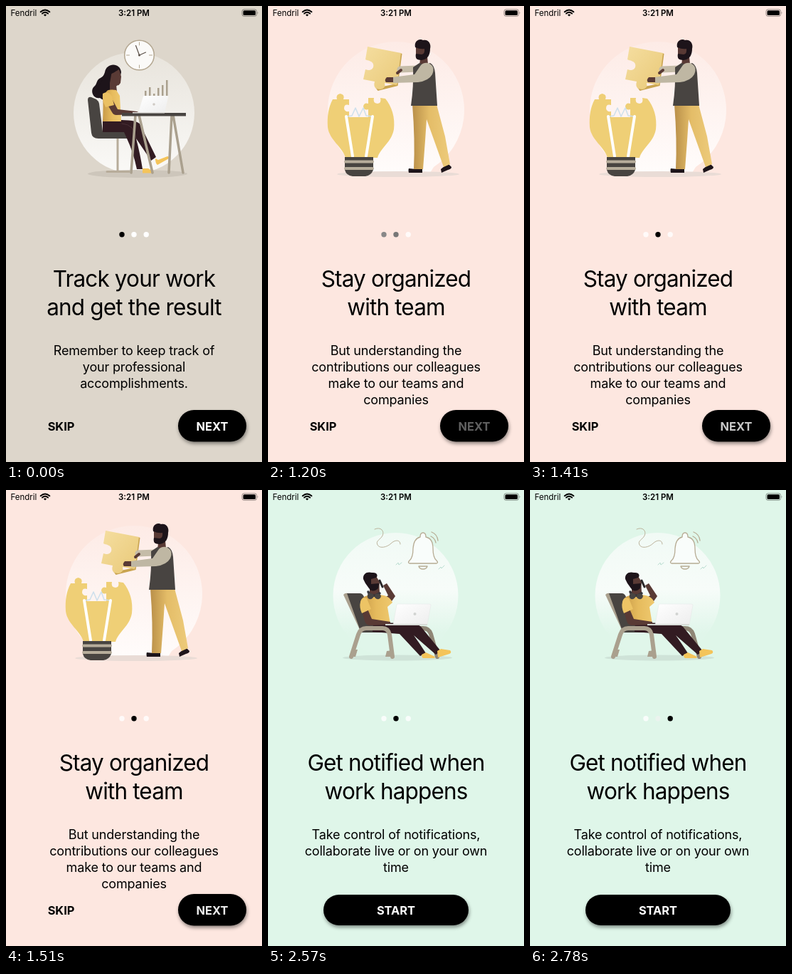
An HTML page for the animation above (2840 ms loop, 360 by 640 pixels).

```html
<!DOCTYPE html>
<html lang="en">
<head>
<meta charset="utf-8">
<title>Onboarding</title>
<style>
html, body { margin: 0; width: 100%; height: 100%; overflow: hidden; }
svg { display: block; width: 360px; height: 640px; }
text { font-family: Inter, Roboto, "Liberation Sans", sans-serif; font-optical-sizing: none; }
.mid text, text.mid { text-anchor: middle; }
.title { font-size: 31.5px; letter-spacing: -.85px; }
.body { font-size: 18px; letter-spacing: -.17px; }
.btn { font-size: 16.4px; font-weight: 700; }
.time { font-size: 11.5px; font-weight: 600; }
.net { font-size: 11.5px; }
.pill { filter: drop-shadow(1.5px 3px 2.5px rgba(0,0,0,.42)); }

.page, .nav, .next, .dot { animation: 2840ms step-end infinite; }
.work { animation-name: work; }
.team { animation-name: team; }
.calm { animation-name: calm; }
.nav { animation-name: nav; }
.next { animation-name: next; }
.d1 { animation-name: d1; }
.d2 { animation-name: d2; }
.d3 { animation-name: d3; }

@keyframes work { 0% { visibility: visible } 38.03%, 100% { visibility: hidden } }
@keyframes team { 0% { visibility: hidden } 38.03% { visibility: visible } 90.49%, 100% { visibility: hidden } }
@keyframes calm { 0% { visibility: hidden } 90.49%, 100% { visibility: visible } }
@keyframes nav { 0% { visibility: visible } 90.49%, 100% { visibility: hidden } }
@keyframes next {
  0% { fill: #fff } 38.03% { fill: #343434 } 42.25% { fill: #606060 } 46.13% { fill: #929292 }
  49.65% { fill: #c8c8c8 } 53.17% { fill: #ececec } 57.04%, 100% { fill: #fff }
}
@keyframes d1 { 0% { fill: #000 } 42.25% { fill: #888 } 46.13%, 100% { fill: #fffc } }
@keyframes d2 {
  0% { fill: #fff } 38.03% { fill: #fffc } 42.25% { fill: #777 } 46.13% { fill: #000 }
  94.37% { fill: #888 } 97.89%, 100% { fill: #ebf3ee }
}
@keyframes d3 { 0% { fill: #fff } 38.03% { fill: #fffc } 94.37% { fill: #777 } 97.89%, 100% { fill: #000 } }

.line { fill: none; stroke-linecap: round; stroke-linejoin: round; }
.dark { fill: #484441; }
.wood { fill: #aaa08e; }
.skin { fill: #593a35; }
.hair { fill: #1d141a; }
.trouser { fill: #321b22; }
.shoe { fill: #f4c45a; }
</style>
</head>
<body>
<svg viewBox="0 0 360 640">
  <defs>
    <linearGradient id="glowA" x2="0" y2="1"><stop stop-color="#e8e4dc"/><stop offset="1" stop-color="#faf9f7"/></linearGradient>
    <linearGradient id="glowB" x2="0" y2="1"><stop stop-color="#fdebe6"/><stop offset="1" stop-color="#fffcfb"/></linearGradient>
    <linearGradient id="glowC" x2="0" y2="1"><stop stop-color="#f1faf5"/><stop offset=".45" stop-color="#f7fcf9"/><stop offset=".8" stop-color="#e0f6ea"/></linearGradient>
    <linearGradient id="shirt"><stop stop-color="#c89a48"/><stop offset=".5" stop-color="#e6bb5d"/><stop offset="1" stop-color="#efc96f"/></linearGradient>
    <linearGradient id="chino"><stop stop-color="#b98f49"/><stop offset=".45" stop-color="#e4bd68"/><stop offset="1" stop-color="#edcb7b"/></linearGradient>
    <linearGradient id="piece" x2="1" y2="1"><stop stop-color="#f5dea0"/><stop offset="1" stop-color="#e9c978"/></linearGradient>
    <linearGradient id="lid" x2="1" y2="1"><stop stop-color="#fff"/><stop offset="1" stop-color="#ededed"/></linearGradient>
  </defs>

  <!-- desk -->
  <g class="page work">
    <path fill="#ddd6cb" d="M0 0h360v640H0z"/>
    <circle cx="180" cy="150" r="85" fill="url(#glowA)"/>
    <ellipse cx="185" cy="235.5" rx="70" ry="5.5" fill="#cdc6bb"/>
    <circle cx="187.5" cy="69" r="20.8" fill="#fbfaf8" stroke="#b3a690" stroke-width="1.5"/>
    <path class="line" stroke="#b3a690" d="M187.500 51v4m0 28v4M169.500 69h4m28 0h4"/>
    <path class="line" stroke="#5b5048" stroke-width="1.200" d="M182.500 55.500l5 13.500 9-4"/>
    <circle cx="187.500" cy="69" r="1.500" fill="#5b5048"/>
    <path class="wood" d="M195 119h2.500v8H195zM201 114h2.500v13H201zM207 123h2.500v5H207zM213 115h2.500v12H213zM219 111h2.500v16H219zM225 104h2.500v23H225z"/>
    <!-- chair -->
    <path class="line" stroke="#b7ac9a" stroke-width="3" d="M157 186v46M142 232.500h31"/>
    <path class="dark" d="M115 132q0-5 5-4l7 3q3 2 4 6l5 39h46q5 0 5 5t-5 5h-52q-9 0-10-8z"/>
    <!-- woman -->
    <path class="trouser" d="M136 160h26q24 0 27 7l22 45-7 5-21-31q6 23 9 43h-8q-5-24-14-43l-4-9h-30z"/>
    <path class="line" stroke="#4a3036" d="M163 165q18 1 20 21"/>
    <path class="shoe" d="M192 228h8l7 4q1 2-1 2.500h-14zM210 214l4 2 13-5q3 0 2 3l-16 9q-3-2-3-9z"/>
    <path class="hair" d="M139 93c2-14 22-14 23 0l-3 14-7 10c-6 16-14 17-20 12-10 2-14-11-8-16 4-3 3-8 7-11 4-2 6-3 8-9z"/>
    <path class="skin" d="M146 96c6-2 9-5 13-7l3 10-1 9q-3 5-6 3l1 9-10 1z"/>
    <path d="M136 121q8-5 19-3l5 8 2 36h-26q1-19 0-41z" fill="url(#shirt)"/>
    <path class="hair" d="M141 93l8-2-3 17q-1 12-10 16l-7-8z"/>
    <path class="skin" d="M139 132l10-2 8 15 27 3q4 1 2 4l-31 1q-4 0-6-4z"/>
    <path d="M136 123q8-5 13 4l3 12-12 3q-5-9-4-19z" fill="#eac062"/>
    <!-- table -->
    <path class="line" stroke="#aaa08e" stroke-width="3.500" stroke-linecap="butt" d="M182 153l-6 81M187 153l19 81M233 153l-4 81M235 153l14 81"/>
    <path class="dark" d="M163 150h90v4.500h-90z"/>
    <path fill="url(#lid)" d="M194 126h33q2 0 1 2l-5 22h-37l7-23z"/>
    <path fill="#e2e0dd" d="M178 149h45v1.500h-45z"/>
    <circle cx="208" cy="138" r="1.800" fill="#cfcac4"/>
    <g class="mid">
      <g class="title"><text x="180" y="394">Track your work</text><text x="180" y="434">and get the result</text></g>
      <g class="body"><text x="180" y="490">Remember to keep track of</text><text x="180" y="513">your professional</text><text x="180" y="536">accomplishments.</text></g>
    </g>
  </g>

  <!-- bulb -->
  <g class="page team">
    <path fill="#fde7e0" d="M0 0h360v640H0z"/>
    <path d="M127 226A96 96 0 1 1 233 226L228 234H132z" fill="url(#glowB)"/>
    <ellipse cx="183" cy="236" rx="86" ry="4" fill="#e9dcd6"/>
    <path d="M91 131l6 0q-2-7 4.500-8 7 1 4.500 8l8 0 0 8q-7-2-7 5 1 5 7 4l0 8 27 0 0-11q-6 2-7-4 1-6 7-4l0-8 8 0q-2 7 5 8 6-1 4-8l7 1c9 11 14 26 12 43-3 18-19 26-23 40H109c-4-15-23-25-25-43-1-15 1-28 7-39z" fill="#efcf76"/>
    <path class="line" stroke="#cfe0ec" stroke-width="1.600" d="M111 155l7-1 5-11 5 12 6-12 4 11 9 1"/>
    <path class="line" stroke="#fff" stroke-width="4" stroke-linecap="butt" d="M110 155l9 56M147 155l-9 56"/>
    <path class="dark" d="M108 212h40v18q-3 8-11 9h-18q-9-1-11-9z"/>
    <path class="line" stroke="#b7ad9b" stroke-width="4" d="M109 218.500h38M109 228h38"/>
    <!-- puzzle piece -->
    <path fill="#c9a450" d="M186 66l2.500 1-6 45-28 7-3-4 30-6z"/>
    <path fill="url(#piece)" d="M140 57l47 9-6 45-17-3q2 8-6 9-11 0-8-11l-16-3 3-14q8 3 11-3 2-8-9-10l-2-1z"/>
    <!-- man -->
    <path class="line" stroke="#c5bca8" stroke-width="9" d="M210 88l-24 1"/>
    <path class="line" stroke="#593a35" stroke-width="4" d="M187 90l-5 4"/>
    <path class="hair" d="M198 228l10 1 9 0v5h-19q-1-4 0-6zM243 229l10-8 5 5q0 3-5 4l-9 4z"/>
    <path d="M203 138h34l12 45 7 39-9 4-24-67-2 30-3 40h-13q2-40-2-91z" fill="url(#chino)"/>
    <path class="skin" d="M208 58q8-6 15 2l2 22q-6 5-12 1l1-8q-6 1-6-4z"/>
    <path class="dark" d="M204 86l9-6q8 4 15 0 6 3 7 14l3 46h-37q4-28 3-54z"/>
    <path class="hair" d="M207 58c-2-9 6-13 11-10 7-2 12 5 10 12 0 8-3 15-12 16-8 0-9-4-8-9l8 1q5-1 4-8-6 1-13-2z"/>
    <path d="M225 80q11 4 6 16-5 9-20 11l-35 1-1-8 31-4 9-13q4-4 10-3z" fill="#bfb7a3"/>
    <path class="skin" d="M176 100l-9 0q-4 4-1 7l10 0z"/>
    <g class="mid">
      <g class="title"><text x="180" y="394">Stay organized</text><text x="180" y="434">with team</text></g>
      <g class="body"><text x="180" y="490">But understanding the</text><text x="180" y="513">contributions our colleagues</text><text x="180" y="536">make to our teams and</text><text x="180" y="559">companies</text></g>
    </g>
  </g>

  <!-- lounge -->
  <g class="page calm">
    <path fill="#dff6e9" d="M0 0h360v640H0z"/>
    <circle cx="179.500" cy="148" r="88" fill="url(#glowC)"/>
    <ellipse cx="182" cy="235.500" rx="77" ry="4" fill="#cfe3d8"/>
    <g class="line" stroke="#b7ac94" stroke-width="1.300">
      <path fill="#f9fdfb" d="M199 103q-3-1 0-4 5-4 5-17 1-14 10-16 0-6 4-6t4 6q10 2 10 16 0 13 5 17 3 3 0 4z"/>
      <path d="M212 107q1 4 6 4t6-4zM229 65q6 3 7 9M230 59q8 3 9 12"/>
      <path d="M150 55c9-4 14 3 11 9s-10 7-7 13 14 3 19-2 13-6 13 1" stroke-width=".900"/>
      <path stroke="#b9ddd0" stroke-width="1" d="M180 105l3-3 1 3 4-3M240 111l3-3 1 2 4-4"/>
    </g>
    <!-- chair -->
    <path class="wood" d="M106 147q2-3 7-2l24 49-8 2z"/>
    <path class="dark" d="M111 145h18q4 0 6 5l17 41-23 4z"/>
    <path class="dark" d="M130 188h64l8 12h-72z"/>
    <path class="line" stroke="#8f8676" stroke-width="6" stroke-linejoin="round" stroke-linecap="butt" d="M187 194h31q8 0 11 8l9 32"/>
    <!-- man -->
    <path class="trouser" d="M148 186l47 1q17 0 21 6l27 33-7 5-31-27q8 11 17 25l-8 4-29-31-38-3z"/>
    <path class="shoe" d="M238 226l5-3 13 2q3 3-1 5l-16 5zM216 231l6-3 13 6-1 2h-16q-2-1-2-5z"/>
    <path class="skin" d="M164 151l10 5 5-7-12-18-5 3 7 14zM143 132l13-4 1 16q-5 10-14 6z"/>
    <path d="M130 157q2-7 10-9l14-1q17 0 21 11l-7 6 4 24h-32q-3-17-10-31z" fill="url(#shirt)"/>
    <path class="skin" d="M131 166l9 1 6 14 26 4v4l-28 1q-6 0-8-6z"/>
    <path d="M130 157q2-8 9-5l6 15-13 6q-4-9-2-16z" fill="#edc465"/>
    <path class="skin" d="M141 122l11-1 5 8-1 9h-12z"/>
    <path class="hair" d="M134 125c-1-8 6-11 12-9 8-1 9 5 6 7l-7 2 0 7 11-1-1 7q-8 7-13 0l-5-7z"/>
    <path class="line" stroke="#2a2628" stroke-width="3" d="M157 127l4 9"/>
    <path class="line" stroke="#35343a" stroke-width="3.500" d="M141 143q2 6 10 5l6-3"/>
    <path class="dark" d="M141 145q7-1 8 4-2 5-7 4-4-3-1-8zM151 146q7-2 8 3-1 5-6 4-5-2-2-7z"/>
    <path fill="url(#lid)" stroke="#e3e7e4" stroke-width=".500" d="M182 160h45q2 0 2 2l-5 27h-48l5-28z"/>
    <path fill="#d8dbd7" d="M165 188h59v2h-59z"/>
    <circle cx="206.500" cy="174" r="2" fill="#d1d3d1"/>
    <path class="line" stroke="#aaa08e" stroke-width="6" stroke-linecap="butt" d="M117 234l10-31q3-9 11-9h23q8 0 10 9l4 31"/>
    <path class="wood" d="M115 234h8l3-10-8 0zM165 234h11l-1-9-8 1z"/>
    <rect class="pill" x="78" y="568" width="204" height="43" rx="21.500"/>
    <text class="btn mid" x="180" y="596" fill="#fff">START</text>
    <g class="mid">
      <g class="title"><text x="180" y="394">Get notified when</text><text x="180" y="434">work happens</text></g>
      <g class="body"><text x="180" y="490">Take control of notifications,</text><text x="180" y="513">collaborate live or on your own</text><text x="180" y="536">time</text></g>
    </g>
  </g>

  <g class="nav">
    <text class="btn mid" x="77.500" y="596">SKIP</text>
    <rect class="pill" x="242" y="567" width="96" height="44.500" rx="22.200"/>
  </g>
  <g class="nav"><text class="btn mid next" x="290" y="596">NEXT</text></g>

  <circle class="dot d1" cx="163" cy="320.700" r="3.700"/>
  <circle class="dot d2" cx="180" cy="320.700" r="3.700"/>
  <circle class="dot d3" cx="197.200" cy="320.700" r="3.700"/>

  <!-- status bar -->
  <text class="net" x="6.500" y="14">Fendril</text>
  <path class="line" stroke="#000" stroke-width="2" stroke-linecap="butt" d="M48.700 8.300q6.300-5.600 12.600 0M51 10.600q4-3.400 8 0"/>
  <path d="M52.800 12.300q2.200-1.700 4.400 0l-2.200 2.300z"/>
  <text class="time mid" x="180" y="14">3:21 PM</text>
  <rect x="332" y="4.800" width="20.500" height="9.600" rx="2.800" fill="none" stroke="#000" stroke-opacity=".4"/>
  <rect x="333.500" y="6.300" width="17.500" height="6.600" rx="1.500"/>
  <path d="M353.700 8q1.600 1.600 0 3.200z" fill-opacity=".45"/>
</svg>
</body>
</html>
```
